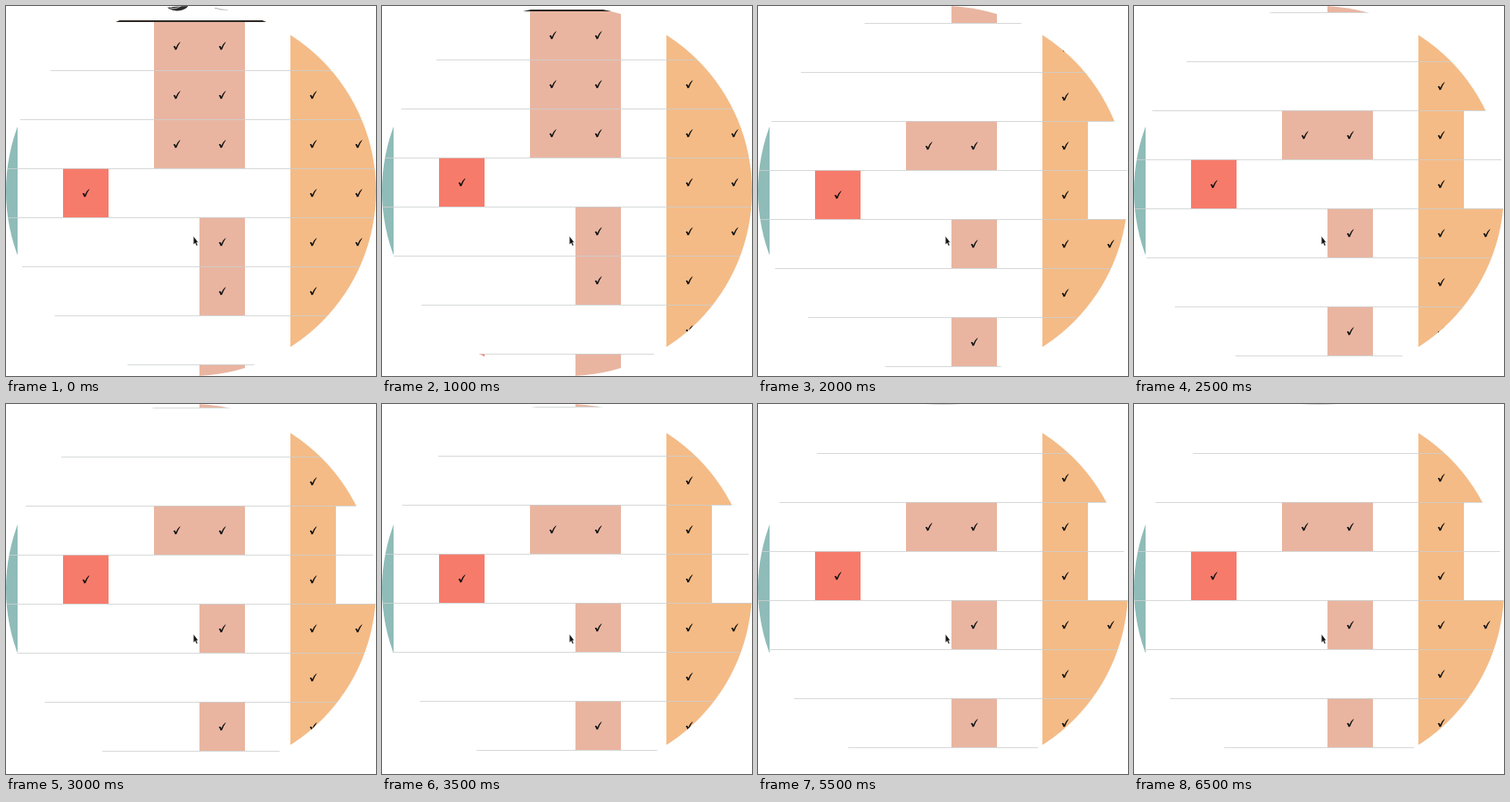
Recreate the animation shown at these times as an HTML page. Size 415 by 415 pixels, loop 8000 ms.

```html
<!DOCTYPE html>
<html lang="en">
<head>
<meta charset="utf-8">
<title>Scrolling check table</title>
<style>
  html, body { margin: 0; width: 100%; height: 100%; overflow: hidden; background: #fff; }
  svg { display: block; width: 100vw; height: 100vh; }
</style>
</head>
<body>
<svg viewBox="0 0 415 415">
  <defs>
    <clipPath id="disc"><circle cx="207.5" cy="207.5" r="207.5"/></clipPath>
    <path id="check" d="M-3.8 .9Q-2.5 -.3 -1.8 .6L-1 2.2Q.8 -2.2 3.6 -4.3L4 -3.8Q1.4 -.5 -.3 4.5L-1.8 4.8Q-2.4 2.2 -3.8 .9Z" fill="#111"/>
  </defs>
  <g clip-path="url(#disc)">
    <rect width="13" height="415" fill="#8fbcb8"/>
    <g id="table">
      <ellipse cx="192" cy="-20" rx="13" ry="8.5" fill="#2b2b2b"/>
      <path d="M184 -15Q190 -13 196 -17" fill="none" stroke="#999" stroke-width="1.5"/>
      <path d="M234 -15Q241 -12 249 -13" fill="none" stroke="#aaa" stroke-width="1"/>
    </g>
  </g>
  <path d="M210.3 258.2V267.4L212.2 265.7L213.6 269L215 268.3L213.6 265.2H215.6Z" fill="#151515" stroke="#fff" stroke-width=".3"/>
</svg>
<script>
const ROW = 55, COL = 51, LEFT = 64;
const fills = ['#f77b6b', '', '#e9b5a1', '#e9b5a1', '', '#f4bb86', '#f4bb86'];

// Ticked columns of each row
const rows = ['2356', '2356', '2356', '056', '356', '356', '56', '03', '03',
              '56', '56', '235', '05', '356', '56', '356', ''];

// Scroll position at each time in ms
const LOOP = 8000;
const scroll = [[0, 17], [1000, 5], [1500, -81], [2000, -476], [2500, -488],
                [3000, -491], [3500, -492], [4000, -493], [4500, -494],
                [5000, -495], [LOOP, -495]];

const table = document.getElementById('table');

function add(tag, attrs) {
  const el = document.createElementNS('http://www.w3.org/2000/svg', tag);
  for (const key in attrs) el.setAttribute(key, attrs[key]);
  table.append(el);
}

rows.forEach((cols, r) => {
  for (const c of cols) {
    const x = LEFT + c * COL, y = r * ROW;
    add('rect', { x, y, width: COL, height: ROW, fill: fills[c], 'shape-rendering': 'crispEdges' });
    add('use', { href: '#check', x: x + COL / 2, y: y + ROW / 2 });
  }
});

for (let r = 1; r <= rows.length; r++) {
  add('rect', { x: 0, y: r * ROW, width: 415, height: 1, fill: '#cdd0d0', opacity: .8 });
}
add('rect', { x: 0, y: -1, width: 415, height: 2, fill: '#2e2a26' });

table.animate(
  scroll.map(([t, y]) => ({
    offset: t / LOOP,
    transform: `translateY(${y}px)`,
    easing: 'steps(1, end)'
  })),
  { duration: LOOP, iterations: Infinity }
);
</script>
</body>
</html>
```
